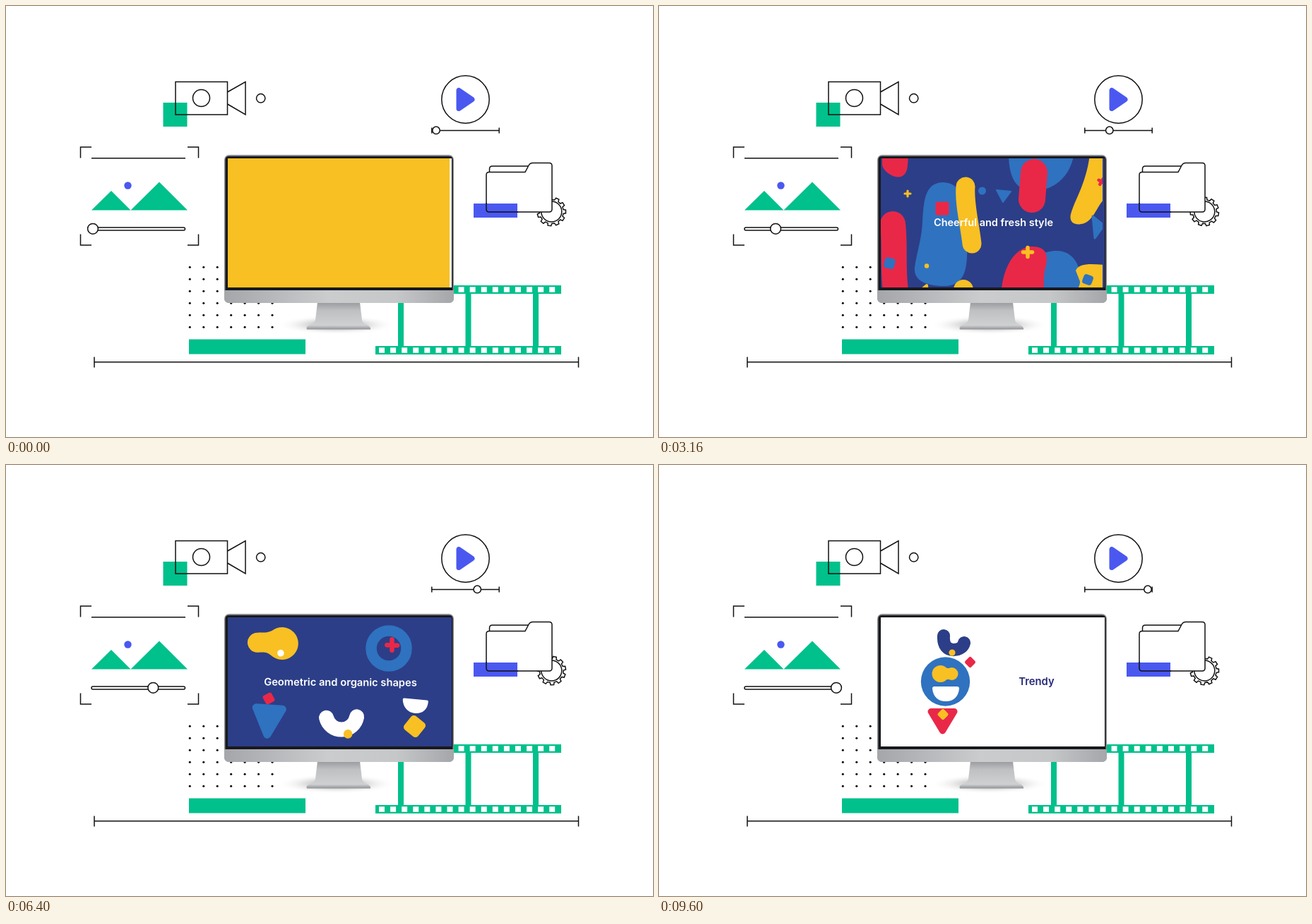
An HTML page that plays this animation: 916 by 611 pixels, repeating every 9.64 s.

```html
<!DOCTYPE html>
<html lang="en">
<head>
<meta charset="utf-8">
<title>Video editing</title>
<style>
html, body { margin: 0; width: 100%; height: 100%; overflow: hidden; background: #fff; }
svg { display: block; width: 916px; height: 611px; }
.line { fill: none; stroke: #111; stroke-width: 1.5; }
.white-line { fill: #fff; stroke: #111; stroke-width: 1.5; }
.green { fill: #00c08b; }
.violet { fill: #4a58f0; }
#screen { stroke-width: 0; stroke-linejoin: round; stroke-linecap: round; }
#screen .y { fill: #f8c023; stroke: #f8c023; }
#screen .b { fill: #2f72c0; stroke: #2f72c0; }
#screen .r { fill: #e92848; stroke: #e92848; }
#screen .n { fill: #2c3e87; stroke: #2c3e87; }
#screen .w { fill: #fff; stroke: #fff; }
#screen .open { fill: none; }
.spin, .pop { transform-box: fill-box; transform-origin: center; }
text { font: 600 15px Inter, sans-serif; text-anchor: middle; fill: #262a77; }
text.light { fill: #fff; }
</style>
</head>
<body>
<svg viewBox="0 0 916 611">
<defs>
  <linearGradient id="chin">
    <stop offset="0" stop-color="#a5a6a9"/><stop offset=".45" stop-color="#cbccce"/>
    <stop offset=".75" stop-color="#c6c7c9"/><stop offset="1" stop-color="#a5a6a9"/>
  </linearGradient>
  <linearGradient id="stand" x2="0" y2="1">
    <stop offset="0" stop-color="#999a9d"/><stop offset=".3" stop-color="#bfc0c2"/>
    <stop offset=".85" stop-color="#cfd0d2"/><stop offset="1" stop-color="#909194"/>
  </linearGradient>
  <radialGradient id="shadow">
    <stop offset="0" stop-color="#777" stop-opacity=".6"/><stop offset=".5" stop-color="#999" stop-opacity=".35"/>
    <stop offset="1" stop-color="#fff" stop-opacity="0"/>
  </radialGradient>
  <clipPath id="glass"><path d="M314 216h317v183h-317z"/></clipPath>
  <clipPath id="art"><path d="M314 216h314v183h-314z"/></clipPath>
  <clipPath id="wave"><path id="wavePath"/></clipPath>
  <clipPath id="open3"><circle id="iris3" cx="473" cy="306"/></clipPath>
  <clipPath id="open4"><circle id="iris4" cx="473" cy="306"/></clipPath>
  <clipPath id="open5"><circle id="iris5" cx="473" cy="306"/></clipPath>
</defs>

<!-- camera -->
<path class="green" d="M222.500 137h34v34h-34z"/>
<g class="line">
  <path d="M240 107.500h73.500v46.500h-73.500zM313.500 122L339 107.500V154L313.500 139"/>
  <circle cx="276.500" cy="130.500" r="12"/><circle cx="360.700" cy="130.800" r="6.200"/>
</g>

<!-- player -->
<circle class="line" cx="650.500" cy="132.500" r="33.700"/>
<path class="violet" d="M641 119.500V145.500L660 132.500z" stroke="#4a58f0" stroke-width="7" stroke-linejoin="round"/>
<path class="line" d="M603 176.500H698M602.800 172.500v8M698.200 172.500v8"/>
<circle id="playKnob" class="white-line" cy="176.300" r="5.200"/>

<!-- picture -->
<path class="line" d="M105.500 215.500V200H121M257 200h15.500v15.500M105.500 323.500V339H121M257 339h15.500V323.500M121 215.700H254"/>
<path class="green" d="M121 289.500L149 262L176.500 289.500L217 249.500L257 289.500z"/>
<circle class="violet" cx="172.500" cy="254.500" r="5.200"/>
<rect class="white-line" x="121" y="314" width="132.500" height="4" rx="2"/>
<circle id="pictureKnob" class="white-line" cy="315.800" r="7.400"/>

<!-- folder -->
<g id="gear"><path id="gearRim" class="white-line"/><circle class="line" r="14.500"/></g>
<path class="white-line" d="M684.500 236V231q0-4 4-4H740V240z"/>
<path class="white-line" d="M680 239.500q0-4 4-4H735L740 226q2-3.500 5.500-3.500H769q4 0 4 4V288q0 4-4 4H684q-4 0-4-4z"/>
<path class="violet" d="M662 280h62v20h-62z"/>
<path class="line" d="M680 279v9q0 4 4 4h41"/>

<!-- film, bars and dots -->
<path class="green" d="M523 396H786v12H523zM523 482H786v12H523zM555 408h8v74h-8zM650.500 408h8v74h-8zM746 408h8v74h-8zM259 472.500h165v21h-165z"/>
<path d="M528 402H782M528 488H782" stroke="#fff" stroke-width="7.500" stroke-dasharray="8 8.080"/>
<path class="line" d="M125 504.700H810.500M125 497.500v15M810.500 497.500v15"/>
<g id="dots"></g>

<!-- monitor -->
<ellipse cx="468" cy="452" rx="84" ry="14" fill="url(#shadow)"/>
<path d="M441 420H501L504 445Q505 450 511 452Q517 455 516 458.500H426Q424 455 430 452Q437 450 438 445z" fill="url(#stand)"/>
<rect x="309" y="211" width="325" height="210" rx="7" fill="#8b8c8f"/>
<path d="M310.500 403V218q0-5 5-5H627.500q5 0 5 5V403z" fill="#18191d"/>
<path d="M309 403H634V414q0 7-7 7H316q-7 0-7-7z" fill="url(#chin)"/>

<g id="screen" clip-path="url(#glass)">
  <path class="w" d="M314 216h317v183h-317z"/>

  <g clip-path="url(#art)">
    <text x="473.500" y="311">Modern and striking design</text>
    <path class="b spin" data-ref="1480" data-rate=".012" stroke-width="8" d="M323 223L372 248L369 200z"/>
    <g class="spin" data-ref="1480" data-rate="-.02">
      <rect class="y" x="556" y="220" width="55" height="55" rx="24" stroke-width="8" transform="rotate(28 583.500 247.500)"/>
      <rect class="w" x="567" y="231" width="33" height="33" rx="8" transform="rotate(36 583.500 247.500)"/>
    </g>
    <rect class="r spin" data-ref="1480" data-rate=".03" x="589" y="266" width="17" height="16" rx="5"/>
    <circle class="y" cx="420.500" cy="269.500" r="8"/>
    <path class="r open spin" data-ref="1480" data-rate="-.015" stroke-width="25" d="M340 340C335 365 355 381 379 378"/>
    <circle class="b" cx="620" cy="354" r="32"/>
    <path id="cover" class="y"/>
    <path id="mound" class="b" d="M549 402C550 388 570 384 585 385C605 386 615 394 619 402z"/>
  </g>

  <g clip-path="url(#wave)">
    <path class="n" d="M314 216h317v183h-317z"/>
    <g clip-path="url(#art)">
      <g id="near">
        <g class="b">
          <path d="M400 250C415 249 427 258 428 275C430 305 438 330 436 355C435 385 425 398 400 397C375 396 360 388 362 370C366 345 372 330 373 305C375 280 375 252 400 250z"/>
          <path d="M495 200C494 235 500 262 530 262C560 262 585 240 588 205z"/>
          <path d="M489 400C490 375 530 350 560 347C590 345 600 375 597 400C600 420 609 425 609 455C612 495 605 522 582 521C552 520 562 480 545 462C525 445 489 430 489 400z"/>
          <path d="M418 430C432 440 425 460 420 480C412 505 410 560 395 580H345C350 560 345 520 345 500C345 475 370 455 380 440C390 427 408 425 418 430z"/>
          <path d="M480 560C490 540 520 528 545 530C575 533 578 545 572 570z"/>
        </g>
        <g class="r">
          <path d="M316 150V225C318 238 345 253 351 232C354 220 353 180 350 150z"/>
          <path class="open" stroke-width="36" d="M331 309C336 350 326 400 346 441"/>
          <path class="open" stroke-width="38" d="M531 236L528 274"/>
          <path d="M485 400C490 360 510 340 530 341C550 342 552 355 546 375C542 400 550 440 542 470C535 500 512 502 500 495C488 485 500 465 507 445C512 425 510 410 485 400z"/>
          <path d="M314 510C330 500 345 510 348 530C352 550 355 560 356 590H314z"/>
          <ellipse cx="507" cy="565" rx="20" ry="18"/>
        </g>
        <g class="y">
          <path class="open" stroke-width="27" d="M434 256C432 280 440 310 443 337"/>
          <path class="open" stroke-width="28" d="M431 402C432 440 436 465 427 502"/>
          <path d="M611 200C607 250 590 270 583 295C580 308 590 312 602 308C615 303 620 285 629 275V200z"/>
          <path d="M590 375C595 363 615 366 632 367V470H615C590 475 580 450 583 425C585 410 600 395 595 388z"/>
          <path d="M606 510C615 506 625 508 632 510V580H590C592 560 602 555 600 535C600 520 600 514 606 510z"/>
        </g>
      </g>
      <g id="far">
        <rect class="r" x="391.500" y="277.500" width="19" height="19" rx="3"/>
        <circle class="b" cx="457.500" cy="262" r="5.500"/>
        <path class="b" stroke-width="2" d="M478 261L498 263L487 278z"/>
        <rect class="b" x="319" y="357" width="15" height="15" rx="4" transform="rotate(15 326 364)"/>
        <circle class="y" cx="379" cy="368.500" r="3.200"/>
        <path class="b" stroke-width="3" d="M614 298L630 311L617 329z"/>
        <rect class="b" x="600" y="381" width="14" height="14" rx="4" transform="rotate(20 607 388)"/>
        <path class="y" stroke-width="4" d="M366 407L379 396L380 411z"/>
        <circle class="y" cx="563.500" cy="416" r="6.300"/>
        <g stroke-width="4.500">
          <path class="y spin" data-ref="3160" data-rate=".02" stroke-width="3.200" d="M348 266h8M352 262v8"/>
          <path class="y spin" data-ref="3160" data-rate=".02" stroke-width="5.500" d="M515.500 349h13M522 342.500v13"/>
          <path class="r spin" data-ref="1660" data-rate=".02" d="M622 249h9M626.500 244.500v9"/>
          <path class="r spin" data-ref="4360" data-rate=".02" d="M426.500 409h9M431 404.500v9"/>
          <path class="r spin" data-ref="2360" data-rate=".02" d="M615.500 467h9M620 462.500v9"/>
        </g>
      </g>
    </g>
    <text class="light" x="473.500" y="311.500" style="font-size:14.500px">Cheerful and fresh style</text>
  </g>

  <g clip-path="url(#open3)">
    <path class="w" d="M314 216h317v183h-317z"/>
    <g clip-path="url(#art)">
      <g id="giants">
        <path class="b spin" data-ref="5400" data-rate=".01" stroke-width="16" d="M363 221L438 315L320 333z"/>
        <circle class="y" cx="462" cy="248" r="48"/>
        <path class="r open spin" data-ref="5400" data-rate="-.015" stroke-width="42" d="M540 249L558 314M517 291L582 272"/>
        <rect class="b spin" data-ref="5400" data-rate=".01" x="595" y="279" width="76" height="76" rx="18" transform="rotate(43 633 317)"/>
        <path class="n open" stroke-width="73" d="M378 375A41 41 0 0 0 460 366"/>
        <path class="y spin" data-ref="5400" data-rate="-.01" stroke-width="14" d="M500 326L601 365L509 423z"/>
      </g>
      <circle class="b" cx="473" cy="306" r="7"/>
    </g>
  </g>

  <g clip-path="url(#open4)">
    <path class="n" d="M314 216h317v183h-317z"/>
    <g class="spin" data-ref="7280" data-sway="5">
      <path class="y" d="M356 237C366 237 369 238 377 235A23 23 0 1 1 376 271C369 264 365 265 356 265A14 14 0 0 1 356 237z"/>
      <circle class="w" cx="388.500" cy="267" r="4.800"/>
    </g>
    <circle class="b open" cx="542" cy="260" r="25" stroke-width="15.500"/>
    <path class="r open spin" data-ref="7280" data-rate=".03" stroke-width="6.500" d="M540 252L553 259M550 248L543 262"/>
    <rect class="r spin" data-ref="7280" data-rate="-.03" x="365" y="324" width="14" height="14" rx="3" transform="rotate(35 372 331)"/>
    <path class="b spin" data-ref="7280" data-sway="6" stroke-width="11" d="M355 343L392 347L369 382z"/>
    <g class="spin" data-ref="7280" data-sway="-6">
      <path class="w open" stroke-width="21" d="M453 359A22 22 0 0 0 496 356"/>
      <circle class="y" cx="484.500" cy="381" r="6.300"/>
    </g>
    <path class="w spin" data-ref="7280" data-sway="5" stroke-width="4" d="M564 332L596 336C595 346 588 351 579 350C570 349 564 342 564 332z"/>
    <rect class="y spin" data-ref="7280" data-sway="8" x="566" y="358" width="25" height="25" rx="5" transform="rotate(42 578.500 370.500)"/>
    <text class="light spin" data-ref="7280" data-sway=".5" x="473.500" y="313" transform="rotate(.5 473 308)" style="font-size:14.700px">Geometric and organic shapes</text>
  </g>

  <g clip-path="url(#open5)">
    <path class="w" d="M314 216h317v183h-317z"/>
    <circle class="b pop" cx="405.500" cy="307" r="34.700"/>
    <path class="w pop" stroke-width="6" d="M390 317H422C421 327 415 332 406 332C397 332 391 327 390 317z"/>
    <g class="y pop"><circle cx="398.500" cy="296" r="12"/><circle cx="414.500" cy="296" r="9"/><path d="M399 288h16v16h-16z"/></g>
    <path class="n open pop" stroke-width="18" d="M403 242C402 257 409 262 417 262C426 262 431 257 432 252"/>
    <circle class="y pop" cx="415" cy="266" r="4.600"/>
    <path class="r pop" stroke-width="9" d="M385 349.500H418L401.500 377z"/>
    <path class="y pop" stroke-width="5" d="M402 348.500L407 353.500L402 358.500L397 353.500z"/>
    <path class="r pop" stroke-width="5" d="M440.500 274.500L445.500 279.500L440.500 284.500L435.500 279.500z"/>
    <text id="trendy" x="534.500" y="311.500" style="font-size:14.800px">Trendy</text>
  </g>
</g>
</svg>

<script>
const LOOP = 9640, STEP = 40;
const $ = id => document.getElementById(id);
const ramp = (t, start, length) => Math.min(1, Math.max(0, (t - start) / length));
const easeOut = u => 1 - (1 - u) ** 3;
const spinners = [...document.querySelectorAll('.spin')];
const pops = [...document.querySelectorAll('.pop')];

// Liquid shape: full screen, hump, gone
const full = [280,440, 240,395, 240,200, 290,190, 380,170, 460,180, 520,180, 600,180, 650,170, 660,190, 670,250, 670,380, 660,440];
const hump = [358,440, 368,395, 362,334, 400,330, 445,326, 480,318, 505,302, 530,288, 555,284, 566,302, 580,325, 588,365, 600,440];
const gone = hump.map((v, i) => i % 2 ? v + 125 : v);

function liquid(phase) {
  const [from, to] = phase < 1 ? [full, hump] : [hump, gone];
  const u = phase < 1 ? phase : phase - 1;
  const p = from.map((v, i) => v + (to[i] - v) * u);
  return `M${p.slice(0, 2)}C${p.slice(2)}z`;
}

function buildStatic() {
  let dots = '';
  for (let col = 0; col < 7; col++)
    for (let row = 0; row < 6; row++)
      dots += `<circle cx="${260.3 + col * 19.45}" cy="${370.3 + row * 17}" r="1.5"/>`;
  $('dots').innerHTML = dots;

  const points = [], pitch = 2 * Math.PI / 11;
  for (let i = 0; i < 11; i++)
    for (const [offset, r] of [[-.3, 17], [-.2, 20.3], [.2, 20.3], [.3, 17]]) {
      const a = (i + offset) * pitch;
      points.push([r * Math.cos(a), r * Math.sin(a)]);
    }
  $('gearRim').setAttribute('d', `M${points.join('L')}z`);
}

function draw(t) {
  $('pictureKnob').setAttribute('cx', 123 + 128 * t / 9600);
  $('playKnob').setAttribute('cx', Math.min(692, 609 + .0091 * t));
  $('gear').setAttribute('transform', `translate(772.3 291.500) rotate(${360 / 11 * t / LOOP})`);

  $('cover').setAttribute('d', liquid(ramp(t, 1000, 480) + ramp(t, 1480, 370)));
  $('mound').setAttribute('transform', `translate(0 ${(1 - ramp(t, 1100, 380)) * 30})`);
  $('wavePath').setAttribute('d', liquid(2 - ramp(t, 2250, 250) - ramp(t, 2500, 300)));
  $('near').setAttribute('transform', `translate(0 ${(3160 - t) * .128})`);
  $('far').setAttribute('transform', `translate(0 ${(3160 - t) * .064})`);

  for (const [id, start] of [['iris3', 4800], ['iris4', 6000], ['iris5', 8300]])
    $(id).setAttribute('r', 195 * ramp(t, start, 350) ** 1.5);
  const grow = .4 + .6 * easeOut(ramp(t, 4800, 550)) + Math.max(0, t - 5400) * .0001;
  $('giants').setAttribute('transform', `translate(473 306) scale(${grow}) translate(-473 -306)`);

  for (const el of spinners) {
    const { ref, rate = 0, sway = 0 } = el.dataset, dt = t - ref;
    const base = /rotate\(([-.\d]+)/.exec(el.getAttribute('transform') || '');
    const angle = (base ? +base[1] : 0) + rate * dt + sway * Math.sin(dt / 320);
    el.style.transform = `rotate(${angle}deg)`;
  }
  pops.forEach((el, i) => {
    el.style.transform = `scale(${easeOut(ramp(t, 8450 + i * 70, 350))})`;
  });
  $('trendy').setAttribute('opacity', ramp(t, 8800, 300));
}

function frame() {
  const t = performance.now() % LOOP;
  draw(t - t % STEP);
  requestAnimationFrame(frame);
}

buildStatic();
frame();
</script>
</body>
</html>
```
